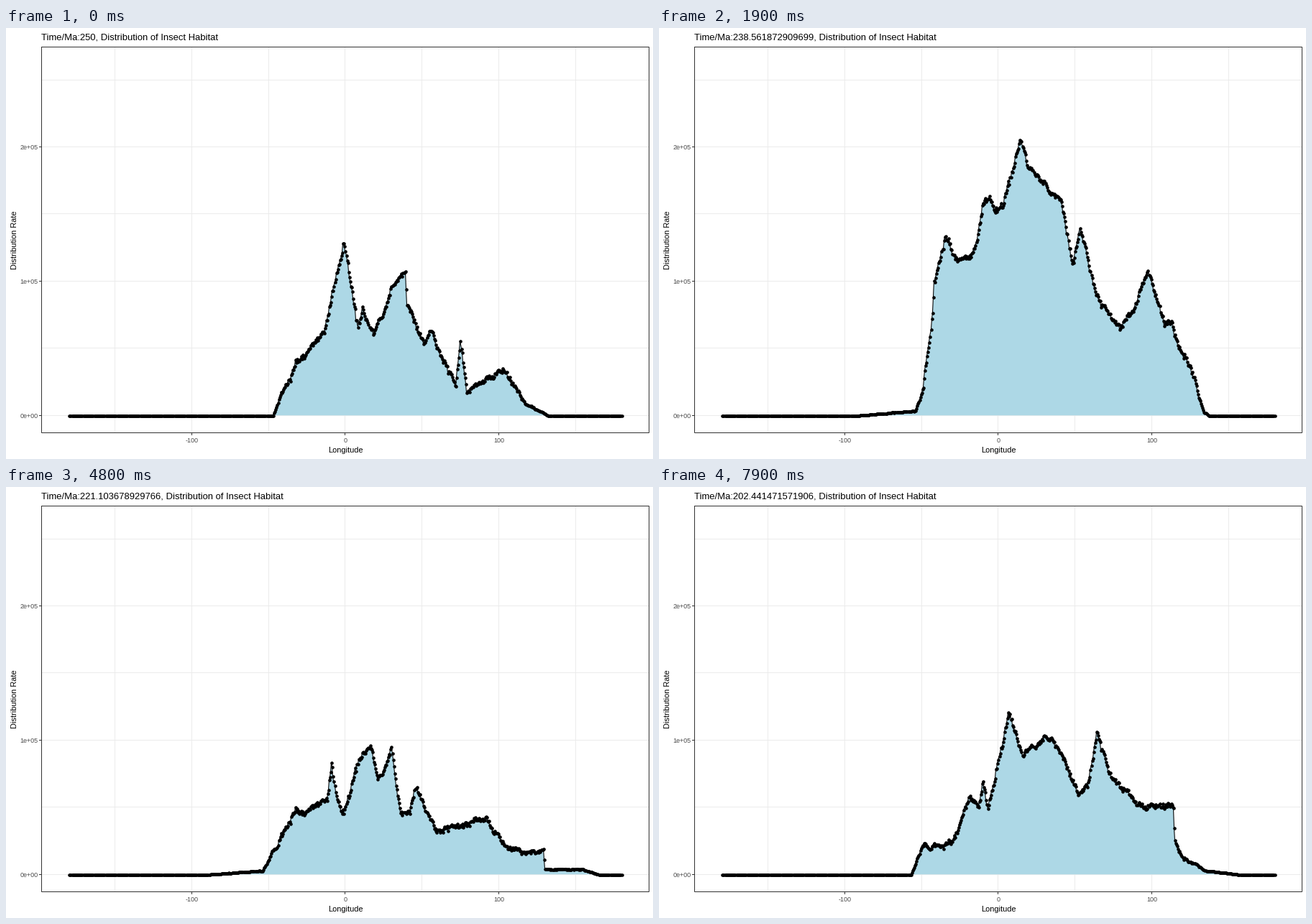
Recreate the animation shown at these times as a matplotlib script. Size 900 by 600 pixels, loop 8000 ms.

```python
import numpy as np
import matplotlib.pyplot as plt
from matplotlib.animation import FuncAnimation

W, H, DPI = 900, 600, 100
FRAMES, STEP_MS = 80, 100
PX = 72 / DPI                      # points per pixel
LEFT, RIGHT, TOP, BOTTOM = 49, 894, 26, 563
GREY, GRID, FRAME = "#4d4d4d", "#ebebeb", "#333333"

plt.rcParams["font.family"] = "Liberation Sans"


def px_x(lon):
    return 471.45 + lon * (RIGHT - LEFT) / 396


def px_y(rate):
    return 538.8 - rate * 186.9e-5


lon = np.linspace(-180, 180, 721)
x = np.round(px_x(lon))

# Ridges that stay at their longitude, plus a fine scatter.
rng = np.random.default_rng(7)
ridge_at = np.arange(-180, 181, 3)
rough = 1800 * np.interp(lon, ridge_at, rng.normal(size=ridge_at.size))
rough += 1100 * rng.normal(size=lon.size)


def outline(*points):
    """Rate along the longitudes from a few (longitude, thousands) turns."""
    at, rate = np.array(points).T
    return 1000 * np.interp(lon, at, rate)


# Main turns of the skyline by step; rates run linearly in between.
OUTLINES = {
    0: outline(
        (-47, 0), (-43, 14), (-28, 45), (-14, 62), (-1, 129), (8, 68),
        (11, 81), (18, 59), (33, 104), (39, 107), (40, 82), (51, 54),
        (55, 63), (72, 22), (75, 56), (79, 18), (103, 34), (118, 9),
        (132, 0)),
    13: outline(
        (-55, 0), (-49, 4), (-43, 75), (-42, 106), (-15, 123), (-10, 172),
        (-1, 155), (14, 214), (19, 177), (25, 190), (41, 160), (49, 112),
        (53, 132), (63, 88), (79, 60), (97, 118), (108, 78), (125, 50),
        (130, 16), (134, 0)),
    26: outline(
        (-92, 0), (-54, 8), (-43, 78), (-35, 157), (-29, 123), (-19, 114),
        (-6, 156), (3, 144), (15, 202), (27, 167), (40, 160), (48, 111),
        (53, 148), (66, 87), (88, 64), (97, 97), (108, 59), (113, 69),
        (120, 34), (137, 0)),
    35: outline(
        (-92, 0), (-54, 12), (-48, 58), (-42, 60), (-35, 141), (-19, 79),
        (-5, 126), (3, 106), (8, 146), (21, 160), (40, 126), (48, 84),
        (53, 131), (66, 71), (80, 62), (88, 35), (99, 62), (109, 33),
        (113, 50), (120, 14), (137, 1)),
    48: outline(
        (-90, 0), (-54, 3), (-35, 43), (-12, 56), (-9, 82), (-6, 56),
        (-1, 46), (9, 89), (16, 96), (21, 70), (30, 94), (36, 47),
        (42, 45), (46, 66), (58, 33), (91, 41), (105, 20), (129, 17),
        (130, 4), (155, 4), (165, 0)),
    62: outline(
        (-59, 0), (-43, 14), (-31, 20), (-27, 38), (-2, 42), (0, 62),
        (7, 102), (20, 65), (25, 80), (34, 76), (52, 37), (60, 45),
        (65, 80), (72, 41), (88, 61), (96, 58), (99, 27), (116, 37),
        (121, 14), (133, 2), (160, 0)),
    79: outline(
        (-57, 0), (-50, 21), (-31, 22), (-19, 58), (-13, 50), (-10, 70),
        (-7, 48), (7, 122), (16, 88), (26, 100), (34, 105), (52, 61),
        (58, 64), (64, 107), (72, 76), (92, 50), (114, 52), (115, 28),
        (120, 13), (135, 3), (157, 0)),
}
STEPS = list(OUTLINES)


def skyline(i):
    """Stage heights of the dots at step i."""
    j = min(np.searchsorted(STEPS, i, side="right"), len(STEPS) - 1)
    a, b = STEPS[j - 1], STEPS[j]
    t = (i - a) / (b - a)
    rate = (1 - t) * OUTLINES[a] + t * OUTLINES[b]
    rate = rate + rough * np.clip(rate / 30000, 0, 1)
    return np.round(px_y(np.maximum(rate, 0)))


# Whole numbers on these axes are pixel centres.
fig = plt.figure(figsize=(W / DPI, H / DPI), dpi=DPI, facecolor="white")
ax = fig.add_axes([0, 0, 1, 1])
ax.set_xlim(-0.5, W - 0.5)
ax.set_ylim(H - 0.5, -0.5)
ax.axis("off")


def rule(xs, ys, color, z=1):
    ax.plot(np.round(xs), np.round(ys), color=color, lw=PX, zorder=z,
            snap=False, solid_capstyle="projecting", solid_joinstyle="miter")


def label(px, py, text, size, color="black", ha="center", **kw):
    return ax.text(px, py, text, fontsize=size * PX, color=color, ha=ha,
                   va="baseline", **kw)


for mark in range(-150, 151, 50):
    rule([px_x(mark)] * 2, [TOP, BOTTOM], GRID)
for mark in range(0, 250001, 50000):
    rule([LEFT, RIGHT], [px_y(mark)] * 2, GRID)

for mark in (-100, 0, 100):
    rule([px_x(mark)] * 2, [BOTTOM, BOTTOM + 3], FRAME, z=6)
    label(px_x(mark), 576.5, str(mark), 9, GREY)
for mark in (0, 1e5, 2e5):
    rule([LEFT - 3, LEFT], [px_y(mark)] * 2, FRAME, z=6)
    label(44, np.round(px_y(mark)) + 3.5, f"{mark:.0e}", 9, GREY, ha="right")

rule([LEFT, RIGHT, RIGHT, LEFT, LEFT], [TOP, TOP, BOTTOM, BOTTOM, TOP],
     FRAME, z=6)
label(471.5, 590.5, "Longitude", 11)
label(14.5, 294.5, "Distribution Rate", 11, rotation=90,
      rotation_mode="anchor")
title = label(48.5, 16.5, "", 13, ha="left")

area, = ax.fill([0], [0], color="#add8e6", lw=0, zorder=3)
curve, = ax.plot([], [], color="black", lw=1.07 * PX, zorder=4)
dots = ax.scatter(x, x, s=(4.6 * PX) ** 2, color="black", lw=0, zorder=5)


def draw(i):
    y = skyline(i)
    curve.set_data(x, y)
    dots.set_offsets(np.column_stack([x, y]))
    base = px_y(0)
    area.set_xy(np.column_stack([np.r_[x[0], x, x[-1]],
                                 np.r_[base, y, base]]))
    age = 250 - i * 180 / 299
    title.set_text(f"Time/Ma:{age:.15g}, Distribution of Insect Habitat")
    return area, curve, dots, title


anim = FuncAnimation(fig, draw, frames=FRAMES, interval=STEP_MS, repeat=True,
                     repeat_delay=0, blit=False)
plt.show()
```
